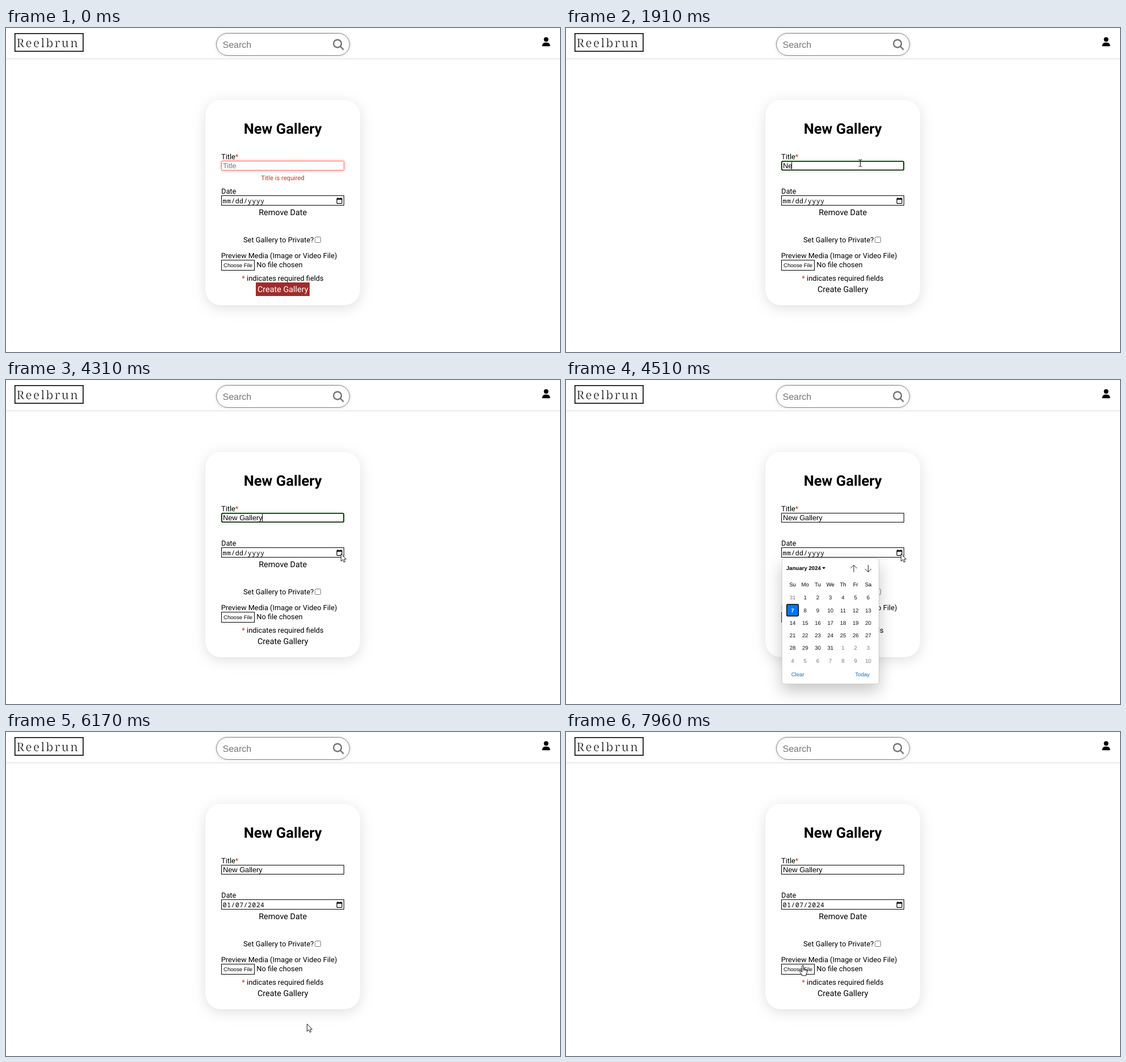
An HTML page that plays this animation: 978 by 573 pixels, repeating every 8000 ms.

```html
<!DOCTYPE html>
<html lang="en">
<head>
<meta charset="utf-8">
<title>New Gallery form</title>
<style>
  html, body { margin: 0; width: 100%; height: 100%; overflow: hidden; background: #fff; }
  svg { display: block; width: 978px; height: 573px; font: 12.8px Roboto, sans-serif; }
  text { white-space: pre; text-rendering: geometricPrecision; }
  .arial { font-family: "Liberation Sans", Arial, sans-serif; }
  .mid { text-anchor: middle; }
  .big { font-size: 14.4px; }
  .small { font-size: 9.6px; }
  .mono { font: 11.7px "Noto Sans Mono", monospace; letter-spacing: .38px; }
  .logo { font: 300 21px "Noto Serif", serif; letter-spacing: 2.3px; stroke: #fff; stroke-width: .6; }
  .box { fill: #fff; stroke: #000; }
  .star { fill: #e0301e; }
  .pointer { fill: #fff; stroke: #000; stroke-width: .9; }
  #card { filter: drop-shadow(0 5.6px 11.6px rgba(100, 100, 111, .2)); }
  #pill { filter: drop-shadow(0 0 2.5px rgba(0, 0, 0, .18)); }
  #popup > rect { filter: drop-shadow(0 12.8px 14px rgba(0, 0, 0, .22)); }
</style>
</head>
<body>
<svg viewBox="0 0 978 573">
  <rect x="15.8" y="9.8" width="120.4" height="31.4" fill="#fff" stroke="#000" stroke-width="1.6"/>
  <text class="logo" x="18.5" y="34">Reelbrun</text>
  <path d="M0 54.5H978" stroke="#dadada"/>
  <rect id="pill" x="371.5" y="9.5" width="235" height="39" rx="19.5" fill="#fff" stroke="#858585"/>
  <text class="arial" x="382.5" y="34.5" font-size="16" fill="#757575">Search</text>
  <g fill="none" stroke="#757575" stroke-width="2.5" stroke-linecap="round">
    <circle cx="585.2" cy="27.6" r="6.9"/>
    <path d="M590.4 32.8L595.4 37.8"/>
  </g>
  <g transform="translate(946.5 16.2) scale(.03125)">
    <circle cx="224" cy="128" r="128"/>
    <path d="M178 304C80 304 0 384 0 482Q0 512 30 512H418Q448 512 448 482C448 384 368 304 270 304Z"/>
  </g>

  <rect id="card" x="352" y="127" width="273" height="363" rx="27" fill="#fff"/>
  <text class="mid" x="488.7" y="187" font-size="25.6" font-weight="700">New Gallery</text>
  <text x="380" y="231.5">Title<tspan class="star">*</tspan></text>
  <rect id="field"/>
  <text id="title" class="arial" x="383" y="247.5"></text>
  <path id="caret" stroke="#000"/>
  <text id="error" class="mid" x="488.5" y="269" font-size="11.2">Title is required</text>

  <text x="380" y="292.5">Date</text>
  <rect class="box" x="380.5" y="296.5" width="216" height="17"/>
  <text id="date" class="mono" x="382.5" y="310"></text>
  <g fill="none" stroke="#000" stroke-width="1.2">
    <rect x="584.1" y="301.6" width="9" height="8.8" rx=".8"/>
    <path d="M584 303H593.2M586 300V302M591.2 300V302" stroke-width="1.7"/>
  </g>
  <text class="mid big" x="488.7" y="331">Remove Date</text>
  <text x="419" y="379">Set Gallery to Private?</text>
  <rect x="545.5" y="369.5" width="10" height="10" rx="2" fill="#fff" stroke="#767676"/>
  <text x="379.8" y="406.5">Preview Media (Image or Video File)</text>
  <rect class="box" x="380.5" y="410.5" width="58" height="18"/>
  <text class="arial small" x="384" y="422.6">Choose File</text>
  <text x="442.3" y="423">No file chosen</text>
  <text class="mid" x="488.5" y="447"><tspan class="star">*</tspan> indicates required fields</text>
  <rect id="button" x="441" y="450" width="95" height="24" fill="#a12c2c"/>
  <text id="create" class="mid big" x="488.7" y="467">Create Gallery</text>

  <g id="popup" class="arial small">
    <rect x="381.2" y="315.5" width="171.3" height="222" rx="4" fill="#fff" stroke="#c4c4c4" stroke-width=".8"/>
    <text x="389" y="336" font-weight="700">January 2024</text>
    <path d="M452.3 331H457.9L455.1 334.4Z"/>
    <path d="M508 340V327.5M502.5 333L508 327.3L513.5 333M533.5 327V339.5M528 334L533.5 339.7L539 334" fill="none" stroke="#222"/>
    <g id="days" class="mid"></g>
    <g fill="#0074cc">
      <text x="397.7" y="524.4">Clear</text>
      <text id="today" x="510.5" y="524.4">Today</text>
    </g>
  </g>

  <g id="arrow"><path class="pointer" d="M.5 .3V13.4L3.5 10.7L5.5 15.2L7.6 14.2L5.7 9.9H9.6Z"/></g>
  <g id="beam"><path d="M-2.5 -6H-.6L.5 -5.5L1.6 -6H3.5M.5 -5.5V5.5M-2.5 6H-.6L.5 5.5L1.6 6H3.5" fill="none" stroke="#000"/></g>
  <g id="hand"><path class="pointer" d="M-1.3 9V1Q-1.3 -.5 0 -.5T1.3 1V6L3.5 6.3L5.7 7L7.5 8.2V12.5L6 15.3V17.8H-1.8V15.8L-5.2 11.2Q-5.7 9.3 -4 9.2L-1.3 11.5ZM1.4 6V9M3.6 6.5V9.3M5.7 7.2V9.8"/></g>
</svg>
<script>
const LOOP = 8000, STEP = 200 / 3, FOCUS = 780, OPEN = 4450, CLOSE = 5970;
const KEYS = [1640, 1850, 1980, 2120, 2450, 2660, 2770, 2870, 2980, 3080, 3180];
// start, end, from, control, to
const MOVES = [
  [70, 710, [930, 535], [690, 350], [519, 239]],
  [3650, 4250, [519, 239], [555, 262], [591, 307]],
  [5040, 5520, [591, 307], [562, 420], [531, 506]],
  [5560, 5850, [531, 506], [531, 511], [531, 516]],
  [6780, 7430, [531, 516], [627, 440], [557, 375]],
  [7560, 7950, [557, 375], [480, 380], [418, 413]],
];
const $ = id => document.getElementById(id);
const clamp = v => Math.max(0, Math.min(1, v));
const show = (el, on) => el.style.display = on ? '' : 'none';
const set = (el, attrs) => { for (const k in attrs) el.setAttribute(k, attrs[k]); };
const mix = (a, b, p) => `rgb(${a.map((v, i) => Math.round(v + (b[i] - v) * p))})`;

function add(tag, attrs, text = '') {
  const el = document.createElementNS('http://www.w3.org/2000/svg', tag);
  set(el, attrs);
  el.textContent = text;
  $('days').append(el);
  return el;
}

const SIDE = 20.6;
const colX = c => 400 + c * 22.25;
const rowY = r => 384.8 + r * 22.25;
const corner = (c, r) => ({ x: colX(c) - SIDE / 2, y: rowY(r) - SIDE / 2 });
const cell = (c, r, fill, stroke, width) => add('rect', {
  ...corner(c, r), width: SIDE, height: SIDE, rx: 1.5, fill, stroke, 'stroke-width': width
});
cell(0, 1, '#0075ff', '#101010', 1.6);
const hover = cell(6, 5, '#b0d4f8', '#33475b', 1);
['Su', 'Mo', 'Tu', 'We', 'Th', 'Fr', 'Sa'].forEach((d, c) => add('text', { x: colX(c), y: 365.4 }, d));
for (let i = 0; i < 42; i++) {
  const picked = i === 7, inMonth = i > 0 && i < 32;
  add('text', {
    x: colX(i % 7), y: rowY(Math.floor(i / 7)) + 3.5,
    fill: picked ? '#fff' : inMonth ? '#101010' : '#767676',
    'font-weight': picked ? 700 : 400
  }, (i + 30) % 31 + 1);
}

function pointerAt(t) {
  let pos = MOVES[0][2];
  for (const [start, end, a, b, c] of MOVES) {
    if (t < start) break;
    const p = clamp((t - start) / (end - start)), e = p * p * (3 - 2 * p), q = 1 - e;
    pos = a.map((v, i) => q * q * v + 2 * q * e * b[i] + e * e * c[i]);
  }
  return pos;
}

function drawField(t) {
  const typed = 'New Gallery'.slice(0, KEYS.filter(k => t >= k).length);
  const focus = t >= FOCUS && t < OPEN, valid = clamp((t - 1640) / 270);
  const title = $('title');
  title.textContent = typed || 'Title';
  set(title, { fill: typed ? '#000' : '#757575' });

  set($('field'), focus
    ? { x: 380.8, y: 235.8, width: 215.4, height: 15.4, rx: 2, fill: '#fff', stroke: '#000', 'stroke-width': 1.6 }
    : { x: 380.5, y: 235.5, width: 216, height: 16, rx: t < FOCUS ? 1 : 0, fill: '#fff',
        stroke: t < FOCUS ? '#f47c78' : '#000', 'stroke-width': 1 });
  const glow = mix([255, 140, 130], [170, 238, 170], valid);
  $('field').style.filter = t < OPEN ? `drop-shadow(0 0 2.8px ${glow})` : 'none';

  // the caret blinks from the last focus or key press
  const since = t - Math.max(FOCUS, ...KEYS.filter(k => t >= k));
  const x = Math.round(383 + (typed ? title.getComputedTextLength() : 0)) - .5;
  set($('caret'), { d: `M${x} 237V250` });
  show($('caret'), focus && since % 1060 < 530);

  show($('error'), t < 1640);
  set($('error'), { fill: t < FOCUS ? '#c8371f' : '#f5302a' });
  const fade = clamp((t - 1640) / 220);
  set($('button'), { opacity: 1 - fade });
  set($('create'), { fill: mix([255, 255, 255], [0, 0, 0], fade) });
}

function drawPopup(t, x, y) {
  show($('popup'), t >= OPEN && t < CLOSE);
  $('date').textContent = t < CLOSE ? 'mm/dd/yyyy' : '01/07/2024';
  const col = Math.round((x - 400) / 22.25), row = Math.round((y - 384.8) / 22.25);
  const over = t > 5040 && col >= 0 && col < 7 && row >= 0 && row < 6;
  show(hover, over);
  if (over) set(hover, corner(col, row));
  set($('today'), { 'text-decoration': y > 513 ? 'underline' : 'none' });
}

function drawPointer(t, x, y) {
  const inTitle = x > 380 && x < 597 && y > 235 && y < 252;
  const onFile = x > 380 && x < 439 && y > 410 && y < 429;
  const kind = inTitle ? 'beam' : onFile ? 'hand' : 'arrow';
  for (const id of ['arrow', 'beam', 'hand']) show($(id), id === kind && t >= 120);
  set($(kind), { transform: `translate(${Math.round(x)} ${Math.round(y)})` });
}

function frame() {
  const t = performance.now() % LOOP;
  const [x, y] = pointerAt(Math.floor((t - 25) / STEP) * STEP + 25);
  drawField(t);
  drawPopup(t, x, y);
  drawPointer(t, x, y);
  requestAnimationFrame(frame);
}
frame();
</script>
</body>
</html>
```
